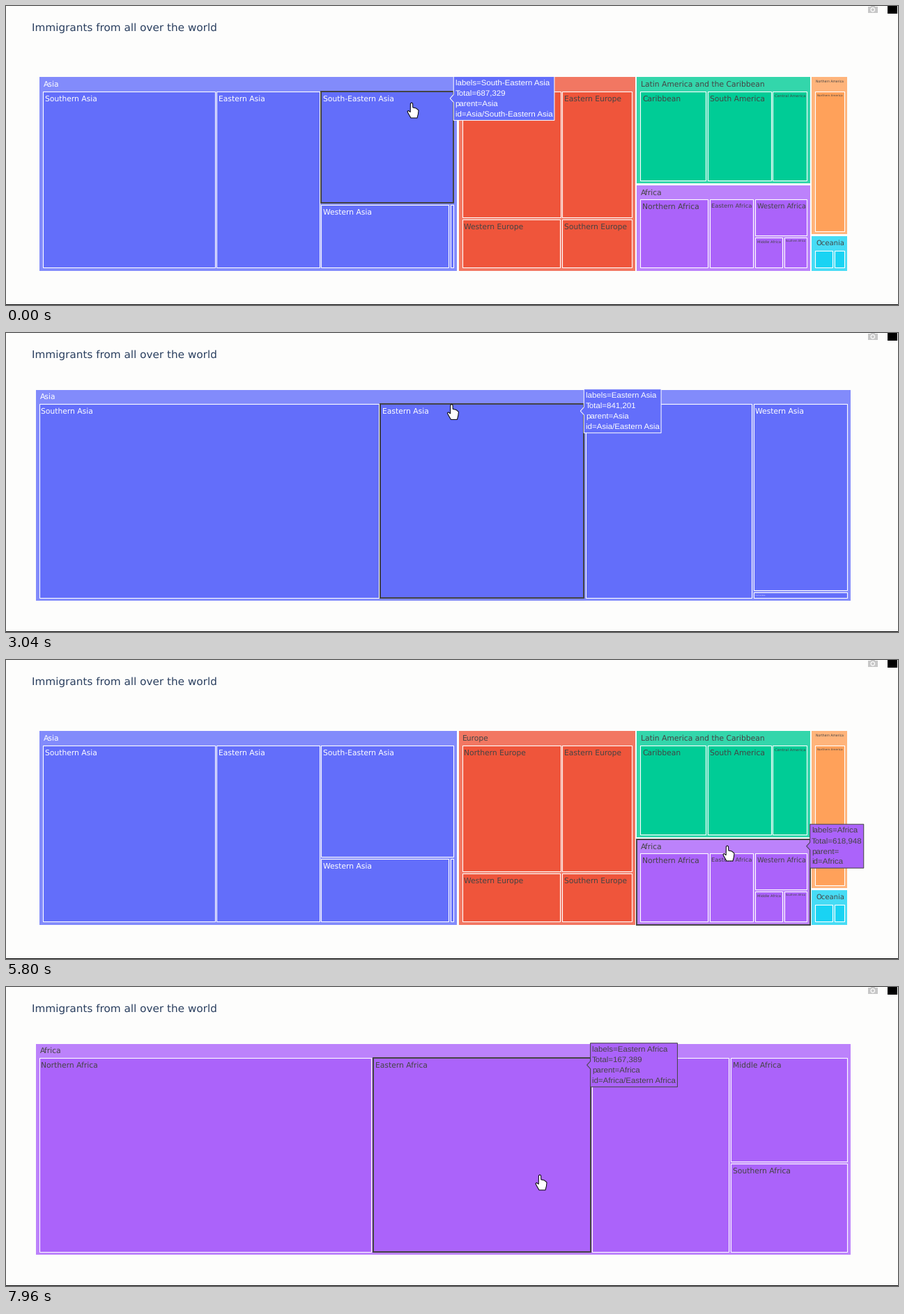
A matplotlib script for the animation above (8 s loop, 1280 px wide and 430 px high).

```python
import matplotlib.pyplot as plt
from matplotlib.animation import FuncAnimation
from matplotlib.colors import to_rgb
from matplotlib.patches import Circle, Polygon, Rectangle
from matplotlib.textpath import TextPath

W, H, DPI = 1280, 430, 100
PX = 72 / DPI
STEP, LOOP, ZOOM_MS = 40, 8000, 800
LABEL, TIP = 10.75, 11.5
DARK = "#444444"
VIEW = (43, 81.5, 1212, 385)
LEFT, TOP, RIGHT, BOTTOM, GAP = 5, 20.7, 4.6, 4.3, 2.8

# sector: (colour, text colour, people per region)
SECTORS = {
    "Asia": ("#636efa", "white", {
        "Southern Asia": 1397164, "Eastern Asia": 841201,
        "South-Eastern Asia": 687329, "Western Asia": 377300, "Central Asia": 14800}),
    "Europe": ("#ef553b", DARK, {
        "Northern Europe": 590000, "Eastern Europe": 421223,
        "Western Europe": 233124, "Southern Europe": 166600}),
    "Latin America and the Caribbean": ("#00cc96", DARK, {
        "Caribbean": 306500, "South America": 295648, "Central America": 163000}),
    "Africa": ("#ab63fa", DARK, {
        "Northern Africa": 255158, "Eastern Africa": 167389,
        "Western Africa": 105901, "Middle Africa": 48800, "Southern Africa": 41700}),
    "Northern America": ("#ffa15a", DARK, {"Northern America": 241142}),
    "Oceania": ("#19d3f3", DARK, {
        "Australia and New Zealand": 34500, "Polynesia": 20674}),
}

# (start ms, sector, zooming in?)
ZOOMS = [(-ZOOM_MS, "Asia", False), (803, "Asia", True), (4222, "Asia", False),
         (6036, "Africa", True)]
# (start ms, end ms, x, y) of each pointer move
MOVES = [(0, 0, 582, 139), (80, 480, 572, 114), (960, 1720, 597, 193),
         (1800, 3200, 641, 99), (3240, 3520, 637, 95), (4740, 4880, 967, 308),
         (4920, 5560, 1035, 267), (7600, 7960, 766, 270)]
ARROW = [(0, 0), (0, 16), (3.7, 12.7), (6.3, 18.4), (8.7, 17.3), (6.2, 11.9),
         (11, 11.6)]
HAND = [(-1.6, 1.2), (0, 0), (1.6, 1.2), (1.8, 7), (6.5, 8), (10, 11), (9.5, 16),
        (8, 22), (-1, 22), (-5, 15), (-6, 12.6), (-4.6, 11.4), (-1.8, 13.6)]


def text_width(s, size, family="DejaVu Sans"):
    return TextPath((0, 0), s, size=size, prop={"family": family}).get_extents().x1


def mix(a, b, k):
    return tuple(p + (q - p) * k for p, q in zip(a, b))


def cubic(u):
    return 4 * u ** 3 if u < 0.5 else 1 - 4 * (1 - u) ** 3


def inside(rect):
    x0, y0, x1, y1 = rect
    return x0 + LEFT, y0 + TOP, x1 - RIGHT, y1 - BOTTOM


def worst_ratio(row, rest, w, h):
    """Worst side ratio when a row of values fills the short side."""
    beta = sum(row) ** 2 * max(w / h, h / w) / rest
    return max(max(row) / beta, beta / min(row))


def squarify(values, rect):
    """Squarified treemap: one rectangle per value, with a gap between them."""
    g = GAP / 2
    x0, y0, x1, y1 = mix(rect, (rect[0] - g, rect[1] - g, rect[2] + g, rect[3] + g), 1)
    cells, values = [], list(values)
    while values:
        w, h, rest = x1 - x0, y1 - y0, sum(values)
        n = 1
        while n < len(values) and (worst_ratio(values[:n + 1], rest, w, h)
                                   <= worst_ratio(values[:n], rest, w, h)):
            n += 1
        row, values = values[:n], values[n:]
        share, done = sum(row) / rest, 0
        for v in row:
            a, b = done / sum(row), (done + v) / sum(row)
            done += v
            if w < h:
                cell = x0 + w * a, y0, x0 + w * b, y0 + h * share
            else:
                cell = x0, y0 + h * a, x0 + w * share, y0 + h * b
            cells.append((cell[0] + g, cell[1] + g, cell[2] - g, cell[3] - g))
        if w < h:
            y0 += h * share
        else:
            x0 += w * share
    return cells


def pushed(rect, focus):
    """Where a rectangle goes when the focused one takes the whole view."""
    x0, y0, x1, y1 = focus

    def slide(v, low, high, v0, v1):
        return v0 if v <= low else v1 if v >= high else v

    def at(x, y):
        return (slide(x, x0 + LEFT + 0.1, x1 - RIGHT - 0.1, VIEW[0], VIEW[2]),
                slide(y, y0 + 0.1, y1 - BOTTOM - 0.1, VIEW[1], VIEW[3]))
    return at(*rect[:2]) + at(*rect[2:])


plt.rcParams["text.hinting"] = "none"
plt.rcParams["font.family"] = "DejaVu Sans"
fig = plt.figure(figsize=(W / DPI, H / DPI), dpi=DPI, facecolor="#fdfdfc")
ax = fig.add_axes([0, 0, 1, 1])
ax.set_xlim(0, W)
ax.set_ylim(H, 0)
ax.axis("off")


class Tile:
    def __init__(self, name, sector, total, head, rect, zooms, order):
        self.name, self.sector, self.total, self.head = name, sector, total, head
        self.rect, self.zooms = rect, zooms
        self.color, self.ink, _ = SECTORS[sector]
        fill = mix(to_rgb(self.color), (1, 1, 1), 0.2 if head else 0)
        self.line = "none" if head else "white"
        self.pad = 5.5 if head else 2.5
        self.width = text_width(name, LABEL)
        self.box = ax.add_patch(Rectangle((0, 0), 1, 1, fc=fill, zorder=order))
        self.label = ax.text(0, 0, name, color=self.ink, zorder=order + 0.5)

    def fit(self, rect):
        w, h = rect[2] - rect[0], rect[3] - rect[1]
        return max(0, min(1, (w - 2 * self.pad) / self.width, (h - 5) / 13))

    def bounds(self, focus, k):
        """Current rectangle, or None when the tile is out of view."""
        x0, y0, x1, y1 = rect = mix(self.rect, self.zooms[focus], k)
        gone = k == 1 and self.sector != focus
        return None if gone or x1 - x0 < 0.3 or y1 - y0 < 0.3 else rect

    def place(self, focus, k, hovered, labelled):
        rect = self.bounds(focus, k)
        scale = self.fit(self.rect) * (1 - k) + self.fit(self.zooms[focus]) * k
        self.box.set_visible(rect is not None)
        self.label.set_visible(rect is not None and labelled and scale > 0.2)
        if rect is None:
            return
        x0, y0, x1, y1 = rect
        self.box.set_bounds(x0, y0, x1 - x0, y1 - y0)
        self.box.set_edgecolor(DARK if hovered else self.line)
        self.box.set_linewidth((2 if hovered else 1.1) * PX)
        self.label.set_fontsize(LABEL * max(scale, 0.1) * PX)
        self.label.set_position((x0 + self.pad, y0 + 2.5 + 11.2 * scale))


def build_tiles():
    made = []
    totals = [sum(style[2].values()) for style in SECTORS.values()]
    frames = dict(zip(SECTORS, squarify(totals, inside(VIEW))))

    def add(name, sector, total, head, rect, own_zoom):
        zooms = {s: pushed(rect, frames[s]) for s in ("Asia", "Africa")}
        zooms[sector] = own_zoom
        made.append(Tile(name, sector, total, head, rect, zooms, len(made)))

    for sector, total in zip(SECTORS, totals):
        people = SECTORS[sector][2]
        add(sector, sector, total, True, frames[sector], VIEW) \
            if sector in ("Asia", "Africa") else \
            add(sector, sector, total, True, frames[sector], frames[sector])
        small = squarify(people.values(), inside(frames[sector]))
        large = squarify(people.values(), inside(VIEW))
        for (name, count), rect, zoom in zip(people.items(), small, large):
            add(name, sector, count, False, rect, zoom)
    return made


tiles = build_tiles()

# fixed parts
ax.text(37, 36, "Immigrants from all over the world", fontsize=15.2 * PX,
        color="#2a3f5f")
ax.add_patch(Rectangle((0, 429), W, 1, fc="black", lw=0))
ax.add_patch(Rectangle((1265, 0), 14, 11, fc="black", lw=0))
camera = "#c7c7c7"
ax.add_patch(Rectangle((1236.5, 1.2), 14.5, 8.6, fc=camera, lw=0))
ax.add_patch(Rectangle((1240.5, 0), 6.5, 2, fc=camera, lw=0))
ax.add_patch(Circle((1243.8, 5.3), 2.7, fc=camera, ec="white", lw=1.2 * PX))

tip_box = ax.add_patch(Polygon([(0, 0), (1, 1), (1, 0)], lw=PX, zorder=100))
tip_lines = [ax.text(0, 0, "", family="Liberation Sans", fontsize=TIP * PX, zorder=101)
             for _ in range(4)]
cursor = ax.add_patch(Polygon(ARROW, fc="white", ec="black", lw=PX, zorder=110))


def show_tip(tile, focus, k):
    for artist in [tip_box, *tip_lines]:
        artist.set_visible(tile is not None)
    if tile is None:
        return
    x0, y0, x1, _ = mix(tile.rect, tile.zooms[focus], k)
    parent = "" if tile.head else tile.sector
    path = tile.name if tile.head else f"{parent}/{tile.name}"
    rows = [f"labels={tile.name}", f"Total={tile.total:,}", f"parent={parent}",
            f"id={path}"]
    w = max(text_width(row, TIP, "Liberation Sans") for row in rows) + 5
    cy = y0 + 10
    top, bottom = cy - 31.5, cy + 31.5
    if x1 + w > W:
        left, beak = (x0 + x1 - w) / 2, []
    else:
        left, beak = x1, [(x1, cy + 5.5), (x1 - 5, cy), (x1, cy - 5.5)]
    tip_box.set_xy([(left, top), (left + w, top), (left + w, bottom), (left, bottom),
                    *beak])
    tip_box.set_facecolor(tile.color)
    tip_box.set_edgecolor(tile.ink)
    for i, (line, row) in enumerate(zip(tip_lines, rows)):
        line.set_text(row)
        line.set_color(tile.ink)
        line.set_position((left + 2.5, cy - 18.5 + 15 * i))


def mouse_at(t):
    spot = MOVES[0][2:]
    for start, end, *goal in MOVES[1:]:
        u = min(1, max(0, (t - start) / (end - start)))
        spot = mix(spot, goal, u * u * (3 - 2 * u))
    return spot


def zoom_at(t):
    start, focus, inward = [z for z in ZOOMS if z[0] <= t][-1]
    u = min(1, (t - start) / ZOOM_MS)
    return focus, inward, u, cubic(u) if inward else 1 - cubic(u)


def tile_under_mouse(t):
    focus, _, _, k = zoom_at(t)
    x, y = mouse_at(t)
    for tile in reversed(tiles):
        rect = tile.bounds(focus, k)
        if rect and rect[0] <= x <= rect[2] and rect[1] <= y <= rect[3]:
            return tile
    return None


def draw(i):
    t = i * STEP
    focus, inward, u, k = zoom_at(t)
    # a click clears the hover for a while; otherwise it trails the pointer
    hover = None if u < 0.34 else tile_under_mouse(t - STEP)
    for tile in tiles:
        tile.place(focus, k, tile is hover, not inward or tile.sector == focus)
    show_tip(hover, focus, int(inward))
    x, y = mouse_at(t)
    shape = ARROW if u < 1 else HAND
    cursor.set_xy([(x + dx, y + dy) for dx, dy in shape])
    return []


anim = FuncAnimation(fig, draw, frames=LOOP // STEP, interval=STEP, repeat=True,
                     repeat_delay=0, init_func=lambda: [])
plt.show()
```
